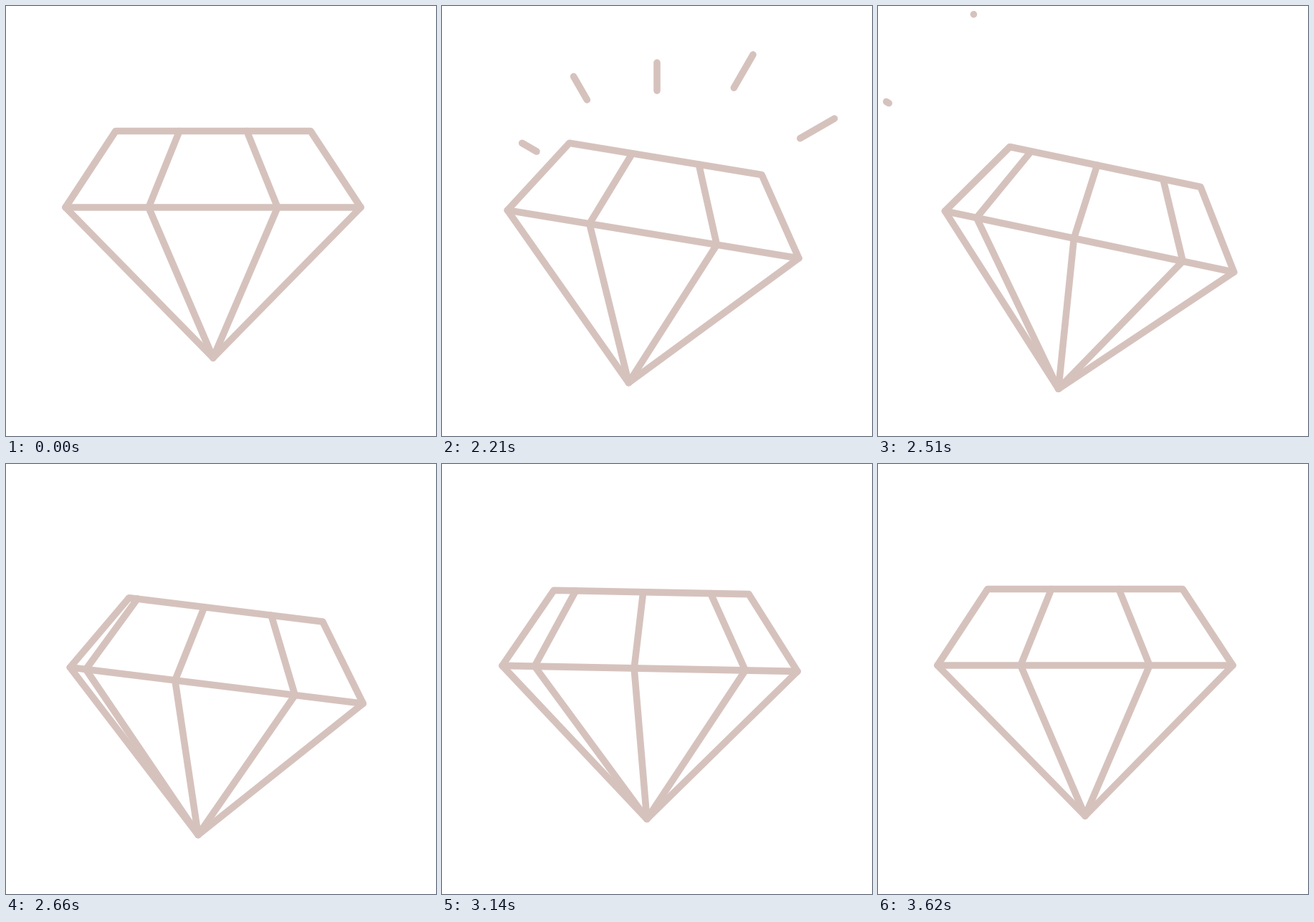
Write an HTML page with a canvas that moves like this. It is 600 by 600 pixels and loops after 3650 ms.

```html
<!DOCTYPE html>
<html>
<head>
<meta charset="utf-8">
<style>
  html, body { margin: 0; width: 100%; height: 100%; overflow: hidden; background: #fff; }
  canvas { display: block; width: 600px; height: 600px; }
</style>
</head>
<body>
<canvas id="stage" width="600" height="600"></canvas>
<script>
const ctx = document.getElementById('stage').getContext('2d');
const LOOP = 3650, REST = 2030, STEP = 30;
const TOP = 174.5, GIRDLE = 281, APEX = [289, 491];
const PIVOT = [63, 334];

const clamp = x => Math.min(1, Math.max(0, x));
const smooth = x => (x = clamp(x), x * x * (3 - 2 * x));

// Cubic bezier easing with horizontal handles of length x1 and 1 - x2.
function ease(x, x1, x2) {
  x = clamp(x);
  if (x === 0 || x === 1) return x;
  let lo = 0, hi = 1;
  for (let i = 0; i < 30; i++) {
    const m = (lo + hi) / 2, n = 1 - m;
    if (3 * n * n * m * x1 + 3 * n * m * m * x2 + m * m * m < x) lo = m; else hi = m;
  }
  return smooth(lo);
}

function line(points, closed) {
  ctx.beginPath();
  points.forEach(p => ctx.lineTo(...p));
  if (closed) ctx.closePath();
  ctx.stroke();
}

function drawFacets(turns) {
  const shift = turns - Math.floor(turns);
  for (let j = -1; j < 3; j++) {
    const u = 0.327 + 0.346 * (shift + j);
    if (u < 0 || u > 1) continue;
    const d = u - 0.5, a = Math.abs(d);
    const g = 0.5 + Math.sign(d) * Math.min(1.27 * a, 0.08 + 0.8 * a);
    line([[153 + 272 * u, TOP], [83 + 412 * g, GIRDLE], APEX]);
  }
}

function drawDiamond(k) {
  const tilt = k < 11 ? smooth((k + 1) / 12) : 1 - ease((k - 11) / 42, 0.18, 0.082);
  ctx.save();
  ctx.translate(...PIVOT);
  ctx.rotate(tilt * 15 * Math.PI / 180);
  ctx.translate(-PIVOT[0], -PIVOT[1]);
  line([[153, TOP], [425, TOP], [495, GIRDLE], APEX, [83, GIRDLE]], true);
  line([[83, GIRDLE], [495, GIRDLE]]);
  drawFacets(5 - 5 * ease((k - 7) / 46, 0.21, 0.18));
  ctx.restore();
}

// Five rays shoot outwards one step apart, from right to left.
function drawRays(k) {
  for (let i = 0; i < 5; i++) {
    const age = k + 1 - i;
    if (age <= 0 || age > 14.1) continue;
    const angle = -(i + 1) * Math.PI / 6;
    const [from, to] = i === 2 ? [175, 289] : [194, 333];
    const point = f => {
      const r = from + (to - from) * f;
      return [300 + r * Math.cos(angle), 300 + r * Math.sin(angle)];
    };
    line([point(smooth((age - 3.4) / 10.7)), point(smooth(age / 11.5))]);
  }
}

function draw(now) {
  const k = Math.max(-1, Math.floor((now % LOOP - REST) / STEP));
  ctx.clearRect(0, 0, 600, 600);
  ctx.strokeStyle = '#d6c2bd';
  ctx.lineWidth = 9.6;
  ctx.lineCap = ctx.lineJoin = 'round';
  drawDiamond(k);
  drawRays(k);
}

const start = performance.now();
function tick() {
  draw(performance.now() - start);
  requestAnimationFrame(tick);
}
tick();
</script>
</body>
</html>
```
